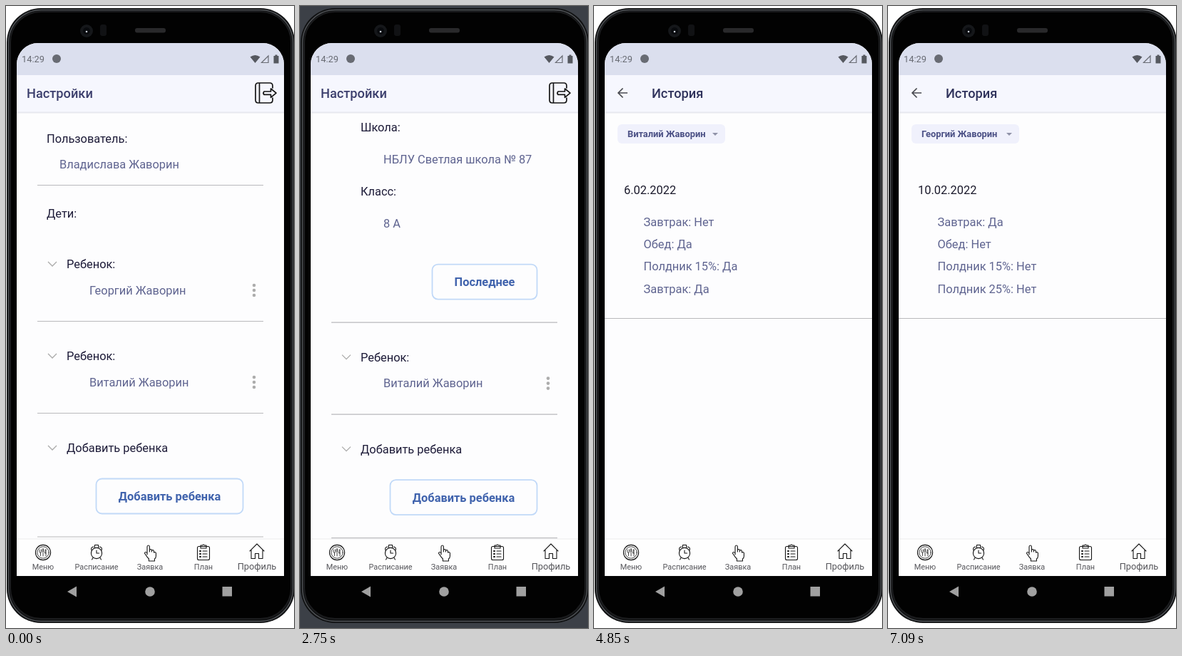
Recreate the animation shown at these times as an HTML page. Size 404 by 873 pixels, loop 8000 ms.

```html
<!DOCTYPE html>
<html lang="ru">
<head>
<meta charset="utf-8">
<title>Настройки</title>
<style>
  html, body { margin: 0; width: 100%; height: 100%; overflow: hidden; background: #fff; }
  #stage { display: block; width: 404px; height: 873px; font-family: Roboto, "Noto Sans", sans-serif; }
  .line { stroke: #b9b9bc; stroke-width: 1.2; }
  .icon { fill: none; stroke: #151515; stroke-width: 1.1; stroke-linecap: round; stroke-linejoin: round; }
  .bold { stroke-width: 1.7; }
</style>
</head>
<body>
<svg id="stage" viewBox="0 0 404 873"></svg>
<script>
const LOOP = 8000;
const INK = '#1d1b38', SOFT = '#5f6490', TITLE = '#3c3f6d', BLUE = '#4063ad';
const BODY_TOP = 150, BODY_H = 598;
const FIRST_Y = 362, SECOND_Y = 491, ADD_Y = 620, DETAIL_Y = 62;
const FIRST_EXTRA = 276, SECOND_EXTRA = 296;
const CLOSED = 'M-6 -3 L0 3 L6 -3', OPEN = 'M-3 -6 L3 0 L-3 6';

const parent = 'Владислава Жаворин', kids = ['Георгий Жаворин', 'Виталий Жаворин'];
const meals = [
  ['10.02.2022', 'Завтрак: Да', 'Обед: Нет', 'Полдник 15%: Нет', 'Полдник 25%: Нет'],
  ['6.02.2022', 'Завтрак: Нет', 'Обед: Да', 'Полдник 15%: Да', 'Завтрак: Да']
];

// Text is placed by the middle of its line.
const text = (x, y, s, fill = INK, size = 16.4, extra = '') =>
  `<text x="${x}" y="${y + size * 0.36}" font-size="${size}" fill="${fill}" ${extra}>${s}</text>`;
const rule = (y, x1 = 44, x2 = 361) => `<line class="line" x1="${x1}" x2="${x2}" y1="${y}" y2="${y}"/>`;
const rect = (x, y, w, h, fill, extra = '') =>
  `<rect x="${x}" y="${y}" width="${w}" height="${h}" fill="${fill}" ${extra}/>`;
const circle = (x, y, r, fill, extra = '') => `<circle cx="${x}" cy="${y}" r="${r}" fill="${fill}" ${extra}/>`;
const button = (x, y, label) =>
  rect(x, y, 332.5 - x, 49, '#fdfdfe', 'rx="8" stroke="#c1d9f8" stroke-width="1.8"') +
  text((x + 332.5) / 2, y + 25, label, BLUE, 16.4, 'font-weight="700" text-anchor="middle"');
const chevron = (id = '') =>
  `<path ${id && `id="${id}"`} d="${CLOSED}" transform="translate(65 0)" fill="none" stroke="#aaa" stroke-width="1.3"/>`;

function child(n, name, school, grade) {
  const shift = (school.length - 1) * 19.5;
  const at = y => y - DETAIL_Y;
  const buttonY = at(n === 1 ? 275 : 294.5);
  return `<g id="child${n}">${chevron('arrow' + n)}
    ${text(85, 0, 'Ребенок:')}${text(117, 37, name, SOFT)}
    ${[30, 37, 44].map(y => circle(348, y, 2.3, '#adadad')).join('')}
    <svg id="detail${n}" y="${DETAIL_Y}" width="404" height="0">
      ${text(85, at(83), 'Школа:')}
      ${school.map((s, i) => text(117, at(128) + i * 19, s, SOFT)).join('')}
      ${text(85, at(173) + shift, 'Класс:')}${text(117, at(218) + shift, grade, SOFT)}
      ${button(185.5, buttonY, 'Последнее')}
      ${n === 2 ? `<svg x="186" y="${buttonY}" width="146" height="49"><circle id="ripple" cx="72" cy="45" r="0" opacity=".045"/></svg>` : ''}
    </svg>
    <g id="end${n}">${rule(0)}</g></g>`;
}

const tabIcons = [
  `<circle r="10.6"/><g stroke-width=".8"><circle r="8.2"/><path d="M-5 -4v3q0 1.500 1.500 1.500v4 M-2.500 -4v3q0 1.500 -1 1.500 M0 5v-6q-2 -2.500 0 -4.500q2 2 0 4.500 M4 5v-9.500q-1.500 2 -1.500 5.500h1.500"/></g>`,
  `<circle cy="1" r="7.6"/><path d="M0 -3v4h3.500 M-7 -3q-1.500 -4.500 3 -5 M7 -3q1.500 -4.500 -3 -5 M-2.500 -7.500v-3h5v3 M-5 7.500l-1.500 2.500 M5 7.500l1.500 2.500"/>`,
  `<path d="M-4 3V-8q0 -2 1.700 -2t1.700 2v7V-4q3 -1 3 1v2v-2q3 -1 3 1v2q3 -1 3 1v4q0 3 -2 4v3h-8v-3q-3 -3 -6 -8q1 -3 3.600 0z"/>`,
  `<rect x="-8.500" y="-8.500" width="17" height="19" rx="2"/><path d="M-4 -6v-4h2.500q1.500 -2 3 0h2.500v4z M-1 -2h6 M-1 2h6 M-1 6h6"/>
   <path d="M-5 -2h1 M-5 2h1 M-5 6h1" stroke-width="2"/>`,
  `<path d="M-10 -2L0 -12L10 -2 M-8 -3.500V8.500h5.500V1.500h5V8.500h5.500V-3.500"/>`
];
const tabNames = ['Меню', 'Расписание', 'Заявка', 'План', 'Профиль'];
const tabs = tabNames.map((s, i) => {
  const x = 52 + 75 * i;
  return `<g class="icon" transform="translate(${x} 767)">${tabIcons[i]}</g>` +
    text(x, 786.7, s, '#55555a', i === 4 ? 12.8 : 10.9, 'text-anchor="middle"');
}).join('');

const phone = `
  <rect id="back" width="404" height="873"/>
  ${rect(1, 3, 404, 863, '#101112', 'rx="48"')}
  ${rect(3.5, 5.5, 399, 858, 'none', 'rx="46" stroke="#505357" stroke-width="1.4"')}
  ${rect(6, 8, 394, 852, '#020202', 'rx="43" stroke="#1b1c1e" stroke-width="2"')}
  ${circle(113, 35, 9, '#15171a')}${circle(113, 35, 5, '#090b0e')}${circle(113, 36, 1.3, '#c9ced6')}
  ${rect(132, 26, 9, 16, '#111214', 'rx="3"')}
  ${rect(181, 31, 43, 6.5, '#29292b', 'rx="3"')}
  <g id="keys"><path d="M99 814.500V829.500L86 822z"/><circle cx="202" cy="822" r="6.800"/><rect x="303.500" y="815" width="13.500" height="13.500"/></g>`;

const statusBar = `
  ${rect(15, 52, 375, 45, '#dbdfee')}
  ${text(22, 74.5, '14:29', '#686b73', 12.8)}
  ${circle(71, 74, 6, '#686b73')}
  <g fill="#55585f"><path d="M342.500 71.500q7 -5 14 0L349.500 80z"/>
  <path d="M368 70V79.500H358.500z" fill="none" stroke="#686b73" stroke-width="1.200"/>
  <path d="M375.500 70h2v-1.500h3V70h2v10.500h-7z"/></g>`;

const header = `
  ${rect(15, 97, 375, 52, '#f6f7fe')}
  ${rect(15, 148.5, 375, 2, '#e7e8f0')}
  <g id="settingsHead">${text(29, 122.5, 'Настройки', TITLE, 18.2, 'font-weight="500"')}
    <g class="icon bold"><path d="M374 115v-3q0 -4 -4 -4h-16q-4 0 -4 4v20q0 4 4 4h16q4 0 4 -4v-3 M355.500 108v28"/>
    <path d="M362 120h9.500v-4l7.500 6.200l-7.500 6.200v-4h-9.500q-2 -2.200 0 -4.400z"/></g></g>
  <g id="historyHead">${text(81, 122.5, 'История', '#30335c', 18.2, 'font-weight="500"')}
    <path d="M47 122H34 M40.500 115.500L34 122L40.500 128.500" fill="none" stroke="#4a4b52" stroke-width="1.700"/></g>`;

const settings = `
  <g id="list">
    ${text(57, 186.5, 'Пользователь:')}${text(75, 222.5, parent, SOFT)}${rule(251.5)}
    ${text(57, 291.5, 'Дети:')}
    ${child(1, kids[0], ['НБЛУ Светлая школа № 87'], '8 А')}
    ${child(2, kids[1], ['Заролинский прикладной', 'лицей'], '4 Б')}
    <g id="add">${chevron()}${text(85, 0, 'Добавить ребенка')}
      ${button(126.5, 43.5, 'Добавить ребенка')}${rule(125)}</g>
  </g>
  <rect id="thumb" x="386" width="4" height="412" fill="#a9a9ac"/>`;

const day = (who, rows) => `<g id="day${who}">
  ${text(47, 179.5, kids[who], '#4b5085', 12.8, 'font-weight="700"')}
  ${text(42, 258, rows[0], '#1b1a2c')}
  ${rows.slice(1).map((s, i) => text(69.5, 303 + 31.2 * i, s, SOFT)).join('')}</g>`;

const mealPage = `<g id="history">${rect(15, 100, 375, 700, '#fdfdfe')}
  <g id="page">${rect(33, 166, 151, 27, '#f0f1fc', 'rx="6"')}
  <path d="M166 178h8l-4 4z" fill="#8f92a8"/>
  ${meals.map((rows, i) => day(i, rows)).join('')}${rule(438.5, 15, 390)}</g></g>`;

const dialog = `<g id="dialog">
  ${rect(39, 373.5, 326.5, 149.5, '#fdfdfd', 'rx="2" filter="url(#shade)"')}
  ${kids.map((s, i) => text(86.5, 418.5 + 60 * i, s, '#151515', 21.9) +
    rect(54, 446 + 60 * i, 297, 2, '#e3e3e3')).join('')}</g>`;

document.getElementById('stage').innerHTML = `
  <defs><clipPath id="screen"><path d="M15 800V82A30 30 0 0 1 45 52H360A30 30 0 0 1 390 82V800z"/></clipPath>
  <filter id="shade" x="-20%" y="-20%" width="140%" height="150%">
    <feDropShadow dx="0" dy="7" stdDeviation="8" flood-opacity=".24"/></filter></defs>
  ${phone}
  <g clip-path="url(#screen)">
    ${rect(15, 52, 375, 748, '#fdfdfe')}
    <svg y="${BODY_TOP}" width="404" height="${BODY_H}" viewBox="0 ${BODY_TOP} 404 ${BODY_H}">${settings}${mealPage}</svg>
    ${statusBar}${header}
    ${rect(15, 748, 375, 52, '#fefefe')}${rect(15, 747.5, 375, 1, '#ededf0')}${tabs}
    <rect id="dim" x="15" y="52" width="375" height="748"/>
    ${dialog}
  </g>`;

const el = {};
document.querySelectorAll('#stage [id]').forEach(node => el[node.id] = node);
const set = (id, attrs) => { for (const k in attrs) el[id].setAttribute(k, attrs[k]); };
const show = (id, on) => set(id, { display: on ? 'inline' : 'none' });
const move = (id, y) => set(id, { transform: `translate(0 ${y})` });

// Holds each value in turn; the last one is reached at the end time.
function stepped(t, start, end, before, values) {
  if (t < start) return before;
  const last = values.length - 1;
  return values[Math.min(last, Math.floor((t - start) / (end - start) * last + 1e-6))];
}

function setChild(n, y, extra, turned) {
  move('child' + n, y);
  set('detail' + n, { height: Math.max(0.01, extra) });
  show('detail' + n, extra > 0);
  move('end' + n, 80.5 + extra);
  set('arrow' + n, { d: turned ? OPEN : CLOSED, stroke: turned ? '#222' : '#aaa' });
}

function draw(t) {
  const swap = stepped(t, 2940, 3170, 0, [.15, .45, .75, .93, 1]);
  const first = stepped(t, 1100, 1280, 0, [.25, .6, .9, 1]) * (1 - swap);
  const scroll = stepped(t, 1890, 2140, 0, [23, 95, 185, 250, 274.4]);
  const extra1 = first * FIRST_EXTRA, extra2 = swap * SECOND_EXTRA;

  set('back', { fill: t >= 1100 && t < 4420 ? '#3c4047' : '#fff' });
  move('list', -scroll);
  setChild(1, FIRST_Y, extra1, t >= 1100 && t < 2940);
  setChild(2, SECOND_Y + extra1, extra2, t >= 2940);
  move('add', ADD_Y + extra1 + extra2);
  set('thumb', {
    y: 148.3 + scroll * 0.683,
    opacity: t < 1890 ? 0 : stepped(t, 2570, 2750, 1, [.75, .5, .25, 0])
  });

  const inHistory = t >= 4420;
  show('settingsHead', !inHistory);
  show('historyHead', inHistory);
  set('ripple', { r: stepped(t, 4420, 4850, 0, [45, 62, 80, 95, 110, 120, 120, 0]) });
  const page = stepped(t, 4420, 4850, 0, [0, .1, .3, .55, .75, .9, .97, 1]);
  set('history', { opacity: page });
  move('page', (1 - page) * 30);

  const closing = t >= 6840;
  show('day0', closing);
  show('day1', !closing);
  const dim = closing ? stepped(t, 6840, 7090, 0, [.59, .42, .18, 0])
    : stepped(t, 5860, 6030, 0, [.06, .27, .49, .59]);
  const pop = closing ? stepped(t, 6840, 7090, 0, [1, .6, .15, 0])
    : stepped(t, 5860, 6030, 0, [.24, .65, .92, 1]);
  set('dim', { opacity: dim });
  set('dialog', { opacity: pop });
  set('keys', { fill: dim > .25 ? '#dcdcdc' : '#a0a0a0' });
}

const begin = performance.now();
function tick() {
  draw((performance.now() - begin) % LOOP);
  requestAnimationFrame(tick);
}
tick();
</script>
</body>
</html>
```
